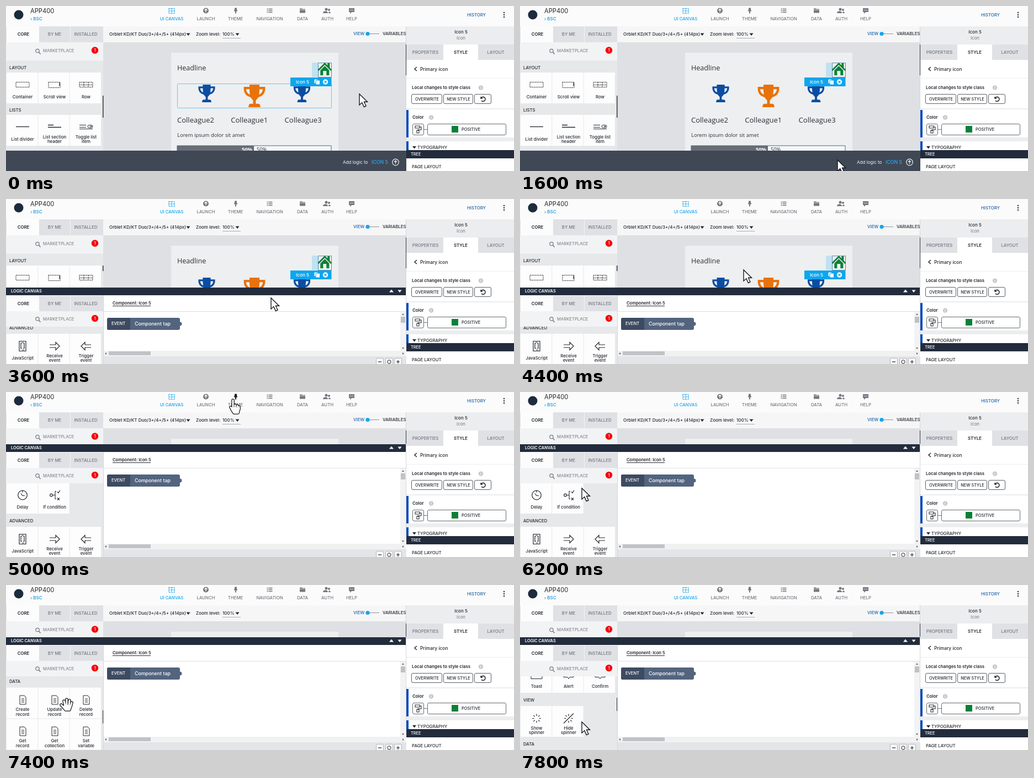
Animation, 920 px wide and 300 px high, one loop 8 s. Source, as an HTML page with a canvas:

```html
<!DOCTYPE html>
<html lang="en">
<head>
<meta charset="utf-8">
<title>App builder logic canvas</title>
<style>
html, body { margin: 0; width: 100%; height: 100%; overflow: hidden; background: #fff; }
canvas { display: block; width: 920px; height: 300px; }
</style>
</head>
<body>
<canvas id="stage" width="920" height="300"></canvas>
<script>
const c = document.getElementById('stage').getContext('2d');
const LOOP = 8000, STEP = 200;
const UI = 'Inter, sans-serif', APP = '"Open Sans", sans-serif';
const INK = '#24272d', GREY = '#73777f', SKY = '#12a5ee', BAR = '#222c3c';
const TILE = '#fdfdfd', HEAD = '#e7e8ea', TAB = '#dfe1e5', COLS = [30, 88, 145];

// Rows are [time, ...values]; values between rows are linear.
const POINTER = [
  [0, 640, 160], [200, 636, 172], [400, 625, 195], [800, 600, 232], [1200, 588, 246],
  [1600, 575, 280], [2000, 575, 285], [2800, 575, 285], [3000, 590, 270], [3200, 617, 232],
  [3600, 480, 180], [4000, 398, 155], [4200, 402, 147], [4400, 405, 129], [4800, 407, 50],
  [5000, 408, 12], [5400, 408, 12], [5600, 385, 45], [6000, 170, 140], [6200, 112, 175],
  [6400, 110, 185], [6800, 110, 243], [7000, 110, 272], [7200, 110, 190], [7600, 110, 244],
  [7800, 112, 249]
];
const PANEL = [[0, 300], [2200, 300], [2400, 230], [2600, 161], [4400, 161], [4800, 95]];
const SCROLL = [[0, 234], [6200, 234], [6400, 255], [6800, 317], [7000, 350], [7200, 400], [7600, 545], [7800, 586]];

function at(keys, t) {
  const i = keys.findIndex(k => k[0] > t);
  if (i < 0) return keys[keys.length - 1].slice(1);
  const a = keys[i - 1], b = keys[i], u = (t - a[0]) / (b[0] - a[0]);
  return a.slice(1).map((v, n) => v + (b[n + 1] - v) * u);
}

function box(x, y, w, h, fill) { c.fillStyle = fill; c.fillRect(x, y, w, h); }

function round(x, y, w, h, r, fill, line, lw = 1) {
  c.beginPath(); c.roundRect(x, y, w, h, r);
  if (fill) { c.fillStyle = fill; c.fill(); }
  if (line) { c.strokeStyle = line; c.lineWidth = lw; c.stroke(); }
}

function dot(x, y, r, fill, line, lw = 1) { round(x - r, y - r, 2 * r, 2 * r, r, fill, line, lw); }

// y is the middle of the capitals.
function text(s, x, y, size = 7.8, color = INK, weight = 400, align = 'left', font = UI) {
  c.font = `${weight} ${size}px ${font}`;
  c.textAlign = align;
  c.fillStyle = color;
  c.fillText(s, x, y + size * 0.36);
}

function mid(s, x, y, size, color, weight) { text(s, x, y, size, color, weight, 'center'); }

function path(d, x, y, line, lw = 1, fill, scale = 1) {
  const p = new Path2D(d);
  c.save();
  c.translate(x, y);
  c.scale(scale, scale);
  if (fill) { c.fillStyle = fill; c.fill(p); }
  if (line) { c.strokeStyle = line; c.lineWidth = lw; c.stroke(p); }
  c.restore();
}

function caret(x, y, color, up) { path(up ? 'M-4 2H4L0 -3Z' : 'M-3.5 -2H3.5L0 2.5Z', x, y, null, 0, color); }

function clipTo(x, y, w, h, draw) {
  c.save();
  c.beginPath(); c.rect(x, y, w, h); c.clip();
  draw();
  c.restore();
}

function header(hover) {
  box(0, 0, 920, 37, '#fbfbfb');
  dot(23, 16, 8.5, '#1c2b3d');
  text('APP400', 44, 9, 11.2, INK);
  text('› BSC', 44, 23, 8, '#1593dc', 500);
  const nav = [['UI CANVAS', 300], ['LAUNCH', 362], ['THEME', 415.5], ['NAVIGATION', 477.5], ['DATA', 537], ['AUTH', 582], ['HELP', 626]];
  nav.forEach(([s, x], i) => mid(s, x, 23.5, 7.8, i ? GREY : SKY, 500));
  c.setLineDash([2, 1]);
  path('M-5 -4.5H5V4.5H-5Z M0 -4.5V4.5 M-5 0H5', 300, 9, SKY, 1.2);
  c.setLineDash([]);
  dot(362, 8.5, 5, GREY);
  path('M0 3V-3M-2.5 -.5L0 -3L2.5 -.5', 362, 8.5, '#fff', 1.3);
  path('M-2 -5H2V-1H3V1H1V5H-1V1H-3V-1H-2Z', 416, 8.5, null, 0, hover ? '#15181d' : GREY);
  path('M-5 -3H-3M-2 -3H5M-5 0H-3M-2 0H5M-5 3H-3M-2 3H5', 477.5, 8.5, GREY, 1.3);
  path('M-5 -4H-1L0 -3H5V4H-5Z', 537, 8.5, null, 0, GREY);
  path('M-5 -1.5H5', 537, 8.5, '#fff', .7);
  dot(580, 6, 2.5, GREY); dot(585, 7, 2, GREY);
  path('M-7 5C-7 0 2 0 2 5Z M3 5C3 2 6 1 7 5Z', 581, 8, null, 0, GREY);
  path('M-5 -4H5V3H0L-3 6V3H-5Z', 626, 8, null, 0, GREY);
  [-2.5, 0, 2.5].forEach(d => dot(626 + d, 7.5, .8, '#fff'));
  text('HISTORY', 835, 16, 7.8, '#1b62a8', 500);
  [12, 16, 20].forEach(y => dot(902, y, 1.2, INK));
}

function tools(y, gap, half) {
  box(0, y - half, 176, 2 * half, TAB);
  box(1, y - half, 59, 2 * half, '#fcfcfc');
  box(116, y - half, 1, 2 * half, '#f4f4f5');
  mid('CORE', 31.5, y, 7.8, INK, 600);
  mid('BY ME', 88, y, 7.8, GREY, 500);
  mid('INSTALLED', 144.5, y, 7.8, GREY, 500);
  box(0, y + half, 176, gap + 18 - half, '#f2f3f4');
  const s = y + gap;
  dot(57, s, 3.2, null, GREY, 1.2);
  path('M0 0L3 3.5', 59.5, s + 2.5, GREY, 1.5);
  text('MARKETPLACE', 67, s, 7.7, GREY);
  dot(161, s - 1, 6.2, '#f5000c');
  mid('1', 161, s - 1, 7.5, '#fff', 500);
}

function label(s, x, y) {
  const lines = s.split('|'), two = lines.length > 1;
  lines.forEach((l, i) => mid(l, x, two ? y - 4.5 + i * 8.6 : y, 7.8, INK, 500));
}

function row(y, items) {
  items.forEach(([name, icon], i) => {
    box(i * 57.3 + 1, y, 56.3, 56, TILE);
    icon(COLS[i], y + 22.5);
    label(name, COLS[i], y + 44.5);
  });
}

const icon = (d, lw = 1) => (x, y) => path(d, x, y, INK, lw);
const dashed = (d, extra) => (x, y) => {
  c.setLineDash([2, 1]);
  path(d, x, y, INK);
  c.setLineDash([]);
  if (extra) path(extra, x, y, INK, 1.3);
};
const rays = Array.from({ length: 8 }, (_, i) => {
  const a = i * Math.PI / 4, p = r => `${(Math.cos(a) * r).toFixed(2)} ${(Math.sin(a) * r).toFixed(2)}`;
  return `M${p(4.5)}L${p(8)}`;
}).join('');
const page = icon('M-5 -8H3L6 -5V8H-5Z M-2 -2H3M-2 1H3M-2 4H3');
const bubble = icon('M-9 -6H9V5H2L0 8L-2 5H-9Z M-4 -1L0 3L4 -1');

const LAYOUT = [
  ['Container', dashed('M-12 -5H12V4H-12Z')],
  ['Scroll view', dashed('M-11 -5H10V5H-11Z', 'M9 -4V2')],
  ['Row', dashed('M-12 -5H12V4H-12Z M-4 -5V4M4 -5V4M-12 0H12')]
];
const LISTS = [
  ['List divider', icon('M-12 -1H12', 1.3)],
  ['List section|header', icon('M-12 -4H-2M-12 0H12', 1.5)],
  ['Toggle list|item', (x, y) => {
    path('M-12 -4H0M-12 0H0M-12 3H12', x, y, INK);
    round(x + 3, y - 4, 9, 5, 2.5, '#fff', INK);
    dot(x + 9, y - 1.5, 1.3, INK);
  }]
];
// Offsets are measured from the last section heading.
const SECTIONS = [
  [-457, 'DIALOGS', [['Toast', icon('M-10 2H10V8H-10Z')], ['Alert', bubble], ['Confirm', bubble]]],
  [-377, 'VIEW', [['Show|spinner', icon(rays, 1.2)], ['Hide|spinner', icon(rays + 'M-9 9L9 -9', 1.2)]]],
  [-297, 'DATA', [['Create|record', page], ['Update|record', page], ['Delete|record', page]],
    [['Get|record', page], ['Get|collection', page], ['Set|variable', page]]],
  [-160, 'DEVICE', [
    ['Scan|QR/barcode', icon('M-7 -3V-7H-3M3 -7H7V-3M7 3V7H3M-3 7H-7V3M-4 -4H-1V-1H-4ZM2 -4H4V-1H2ZM-4 2H-1V4H-4ZM2 2H4V4H2Z', 1.5)],
    ['Take photo', (x, y) => {
      path('M-9 -5H-4L-2 -8H3L5 -5H9V7H-9Z', x, y, INK, 1.3);
      dot(x, y + 1, 4, null, INK, 1.3);
      dot(x, y + 1, 1.5, null, INK);
    }],
    ['GPS|location', (x, y) => {
      path('M0 5C-3 1 -5 -1 -5 -4A5 5 0 0 1 5 -4C5 -1 3 1 0 5Z M-4 4C-11 8 11 8 4 4', x, y, INK);
      dot(x, y - 4, 1.8, null, INK);
    }]]],
  [-80, 'UTILITY', [
    ['Delay', (x, y) => { dot(x, y, 8.3, null, INK, 1.2); path('M0 -8V-5M-3 -3L0 1L4 1', x, y, INK, 1.2); }],
    ['If condition', (x, y) => {
      dot(x - 6, y, 2.3, null, INK, 1.2);
      path('M-3 0H1M1 -7V7M1 -7H3M1 7H3M5 -6L7 -4L10 -9M5 5L9 9M9 5L5 9', x, y, INK, 1.1);
    }]]],
  [0, 'ADVANCED', [
    ['JavaScript', icon('M-6 -9H6V9H-6ZM-1 -5H-3V4H-1M1 -5H3V4H1M-2 -7H2M-1 7H3', 1.2)],
    ['Receive|event', icon('M-9 -2.5H2V-7L9 0L2 7V2.5H-9', 1.2)],
    ['Trigger|event', icon('M9 -2.5H-2V-7L-9 0L-2 7V2.5H9', 1.2)]]]
];

function leftPanel(p) {
  box(0, 37, 176, 226, HEAD);
  tools(51.5, 30, 14.5);
  text('LAYOUT', 6, 112.5, 7.8, INK, 500);
  row(121, LAYOUT);
  text('LISTS', 6, 189.5, 7.8, INK, 500);
  row(198, LISTS);
  if (p > 200) box(175, 163, 1.5, 40, '#33373e');
  else if (p > 130) box(175, 121, 1.5, 10, '#33373e');
}

function trophy(x, y, size, color) {
  path('M.28 0H.72V.1H.97C1 .4 .83 .52 .67 .56C.62 .64 .57 .67 .56 .7V.85H.66C.74 .85 .76 .91 .76 1H.24C.24 .91 .26 .85 .34 .85H.44V.7C.43 .67 .38 .64 .33 .56C.17 .52 0 .4 .03 .1H.28Z', x - size / 2, y, null, 0, color, size);
  const hole = 'M.13 .2H.28C.28 .3 .29 .38 .3 .44C.2 .4 .14 .31 .13 .2Z';
  path(hole, x - size / 2, y, null, 0, '#eeeff0', size);
  c.save();
  c.translate(2 * x, 0); c.scale(-1, 1);
  path(hole, x - size / 2, y, null, 0, '#eeeff0', size);
  c.restore();
}

function preview(outlined) {
  box(176, 37, 549, 30, '#f6f6f7');
  text('Orblet KD/KT Duo/3+/4+/5+ (414px)', 187, 51.5, 8, INK, 500);
  caret(330, 51.5, INK);
  text('Zoom level:', 344, 51.5, 8, INK, 500);
  text('100%', 392, 51, 8, INK, 500);
  box(392, 58, 33, 1, '#a9acb1');
  caret(419, 51.5, INK);
  text('VIEW', 629, 50.5, 7.8, '#1b62a8', 500);
  box(655, 50, 21, 1, '#8d9197');
  dot(655, 50.5, 3.6, SKY);
  text('VARIABLES', 682, 50.5, 7.8, INK, 500);

  box(176, 66, 549, 197, '#dfe0e3');
  box(299, 85, 303, 178, '#eeeff0');
  const say = (s, x, y, size, color = '#2c2f34', weight = 400) => text(s, x, y, size, color, weight, 'left', APP);
  say('Headline', 310, 112, 12.6);
  if (outlined) round(310.5, 141.5, 279, 44, 1, null, '#74c3ec');
  trophy(363.5, 143, 32, '#0b4da2');
  trophy(450, 143, 41, '#e8720c');
  trophy(536, 143, 32, '#0b4da2');
  ['2', '1', '3'].forEach((n, i) => say('Colleague' + n, 310 + i * 97.3, 207, 13));
  say('Lorem ipsum dolor sit amet', 310, 234.5, 9.5);
  box(310, 254, 139, 9, '#6a6d72');
  box(449, 254, 140, 9, '#f7f7f7');
  round(310, 254, 279, 14, 0, null, '#2b6fb5');
  say('50%', 427, 261, 9.3, '#fff', 700);
  say('50%', 454, 261, 9.3);

  box(554, 103, 11, 26, '#bfe2f3');
  round(565.5, 103.5, 24, 26, 0, null, '#5a8fae');
  path('M-13 2L0 -11L5 -6V-10H9V-2L13 2L11 4L0 -7L-11 4Z M-8 3L0 -5L8 3V12H3V4H-3V12H-8Z', 577.3, 114, null, 0, '#0b8038');
  box(515, 130, 74.5, 16, '#0da6ee');
  text('Icon 5', 525, 138, 8.2, '#fff', 500);
  round(558.5, 133.5, 6, 7, 1, '#fff');
  round(561, 135, 7.5, 8, 1, '#fff', '#0da6ee');
  dot(578.5, 138, 4.7, '#fff');
  path('M-2 -2L2 2M2 -2L-2 2', 578.5, 138, '#0da6ee', 1.3);
}

function info(x, y) { dot(x, y, 4.2, '#c6c8cc'); mid('i', x, y, 6.5, '#fff', 700); }

function rightPanel(p) {
  box(725, 37, 195, 263, '#ecedef');
  box(724, 37, 1, 226, '#d5d7da');
  box(724, 70, 1.5, p > 130 ? 56 : 24, '#343840');
  mid('Icon 5', 824, 47, 8, INK, 500);
  mid('Icon', 824, 58.5, 7.8, GREY);
  box(725, 70, 195, 28, TAB);
  box(792, 70, 63, 28, '#fff');
  mid('PROPERTIES', 759.5, 84, 7.8, GREY, 500);
  mid('STYLE', 823.5, 84, 7.8, INK, 600);
  mid('LAYOUT', 887, 84, 7.8, GREY, 500);
  box(725, 98, 195, 33, '#fff');
  path('M2 -3.5L-2 0L2 3.5', 742, 114.5, INK, 1.5);
  text('Primary icon', 750, 114.5, 8.4, INK, 500);
  box(725, 132, 195, 54, '#fff');
  text('Local changes to style class', 735, 148.5, 7.8, INK, 600);
  info(860, 148.5);
  [[735, 55, 'OVERWRITE'], [793, 53, 'NEW STYLE'], [849, 30, '']].forEach(([x, w, s]) => {
    round(x - .5, 160.5, w, 17, 2.5, '#fff', '#5b5f66');
    mid(s, x + w / 2, 169, 7.3, INK, 500);
  });
  path('M-4 -4V-1H-1M-3.5 -1.5A4 4 0 1 1 -3 3', 864, 169, INK, 1.5);
  box(725, 188, 195, 51, '#fff');
  box(725, 189, 4, 50, '#0b4bc0');
  text('Color', 736, 202.5, 7.9, INK, 600);
  info(770, 202.5);
  box(757, 224, 6, 1, '#777');
  round(736.5, 214.5, 20, 20, 2.5, '#fff', '#666a70');
  path('M-5 -6H3V-2H-5ZM3 -4H6V1H0V3M-2 2H2V7H-2Z', 746, 224, INK, 1.1);
  round(763.5, 214.5, 142, 20, 2.5, '#fff', '#666a70');
  box(807, 218, 12, 12, '#0b8038');
  text('POSITIVE', 825, 224.5, 7.5, INK, 500);
  box(725, 246, 195, 17, '#fff');
  box(725, 246, 4, 17, '#0b4bc0');
  caret(739.5, 257, INK);
  text('TYPOGRAPHY', 745, 257, 7.8, INK, 500);
  box(725, 262, 195, 15, BAR);
  text('TREE', 733, 269.5, 7.4, '#fff', 500);
  box(725, 277, 195, 23, '#fff');
  text('PAGE LAYOUT', 735, 292, 7.8, INK, 500);
}

function footer() {
  box(0, 263, 725, 37, '#404856');
  text('Add logic to', 610, 284, 8, '#f2f3f5');
  text('ICON 5', 662, 284, 8.8, '#25a9f0', 500);
  dot(705.5, 284, 5.8, null, '#f2f3f5', 1.2);
  path('M0 3V-3M-2.5 -.5L0 -3L2.5 -.5', 705.5, 284, '#f2f3f5', 1.2);
}

function logicList(p, base) {
  clipTo(0, p + 71, 176, 300, () => {
    box(0, p + 71, 176, 300, HEAD);
    for (const [off, name, ...rows] of SECTIONS) {
      const y = base + off;
      if (y > 320 || y + 130 < p) continue;
      text(name, 6, y, 7.8, INK, 500);
      rows.forEach((r, i) => row(y + 11 + i * 57, r));
    }
  });
  if (base > 400) box(175, 205 + (586 - base) * .2, 1.5, 24, '#33373e');
}

function logicPanel(p, base) {
  box(0, p, 725, 300 - p, '#fff');
  box(0, p, 725, 14, BAR);
  text('LOGIC CANVAS', 9, p + 6.8, 7.4, '#fff', 600);
  caret(698, p + 6.5, '#fff', true);
  caret(713, p + 6.5, '#fff');
  tools(p + 29, 28, 14);
  logicList(p, base);
  box(176, p + 14, 1, 300, '#d4d6d9');
  text('Component: Icon 5', 193, p + 28.5, 7.6, INK, 600);
  box(193, p + 33, 69, 1, INK);
  box(177, p + 43, 548, 1, '#dedfe2');

  round(183, p + 55, 132, 22, 3, '#53647f');
  round(183, p + 55, 42, 22, [3, 0, 0, 3], '#3d4b62');
  dot(315, p + 66, 3.5, '#53647f');
  mid('EVENT', 203.5, p + 65.5, 7.6, '#fff', 500);
  text('Component tap', 233, p + 65.5, 8.8, '#fff', 500);

  box(714, p + 44, 10, 232 - p, '#f3f3f4');
  path('M-2 1H2L0 -2Z', 719, p + 49, null, 0, '#666');
  box(715, p + 53, 8, 11, '#bfc1c4');
  path('M-2 -1H2L0 2Z', 719, 271, null, 0, '#666');
  box(177, 276, 547, 10, '#f1f1f2');
  path('M1 -2V2L-2 0Z', 181, 281, null, 0, '#666');
  path('M-1 -2V2L2 0Z', 719, 281, null, 0, '#666');
  box(186, 277, 76, 7, '#c0c2c5');
  box(177, 286, 548, 14, '#e4e5e8');
  [677, 694, 710].forEach((x, i) => {
    round(x - 6.5, 289.5, 13, 12, 1.5, '#f7f7f8', '#b5b8bd');
    if (i === 1) dot(x, 296, 3.2, null, INK);
    else path(i ? 'M-3 0H3M0 -3V3' : 'M-3 0H3', x, 296, INK, 1.2);
  });
}

function arrow(x, y) {
  path('M0 0V20L4.8 15.6L8.4 23.5L12 21.8L8.5 14.2H14.5Z', x, y, '#15171a', 1.4, '#fff');
}

function hand(x, y, fingers, palm) {
  c.lineCap = c.lineJoin = 'round';
  [[5.6, '#17191c'], [3.1, '#fff']].forEach(([w, color]) => {
    path(fingers, x, y, color, w);
    path(palm, x, y, color, w, color);
  });
  c.lineCap = 'butt';
  c.lineJoin = 'miter';
}

function cursor(t, x, y) {
  if (t >= 5000 && t < 5600) {
    hand(x, y, 'M3 3V17M7 12V17M11 13V18M14 15V19M-1 16L3 21', 'M3 17L14 18L12 26H5L1 20Z');
  } else if (t >= 6400 && t < 7800) {
    hand(x, y, 'M-5 -6L-3 2M0 -9V1M5 -7L4 2M9 -3L7 4M-10 1L-5 6', 'M-3 2L7 3L5 10H-2L-6 5Z');
  } else arrow(x, y);
}

function draw(t) {
  const [p] = at(PANEL, t), [base] = at(SCROLL, t), [x, y] = at(POINTER, t);
  c.clearRect(0, 0, 920, 300);
  header(t >= 5000 && t < 5600);
  preview(t < 400);
  leftPanel(p);
  footer();
  if (p < 300) clipTo(0, p, 725, 300 - p, () => logicPanel(p, base));
  rightPanel(p);
  cursor(t, x, y);
}

const start = performance.now();
function tick() {
  const t = (performance.now() - start) % LOOP;
  draw(Math.floor(t / STEP) * STEP);
  requestAnimationFrame(tick);
}
tick();
</script>
</body>
</html>
```
